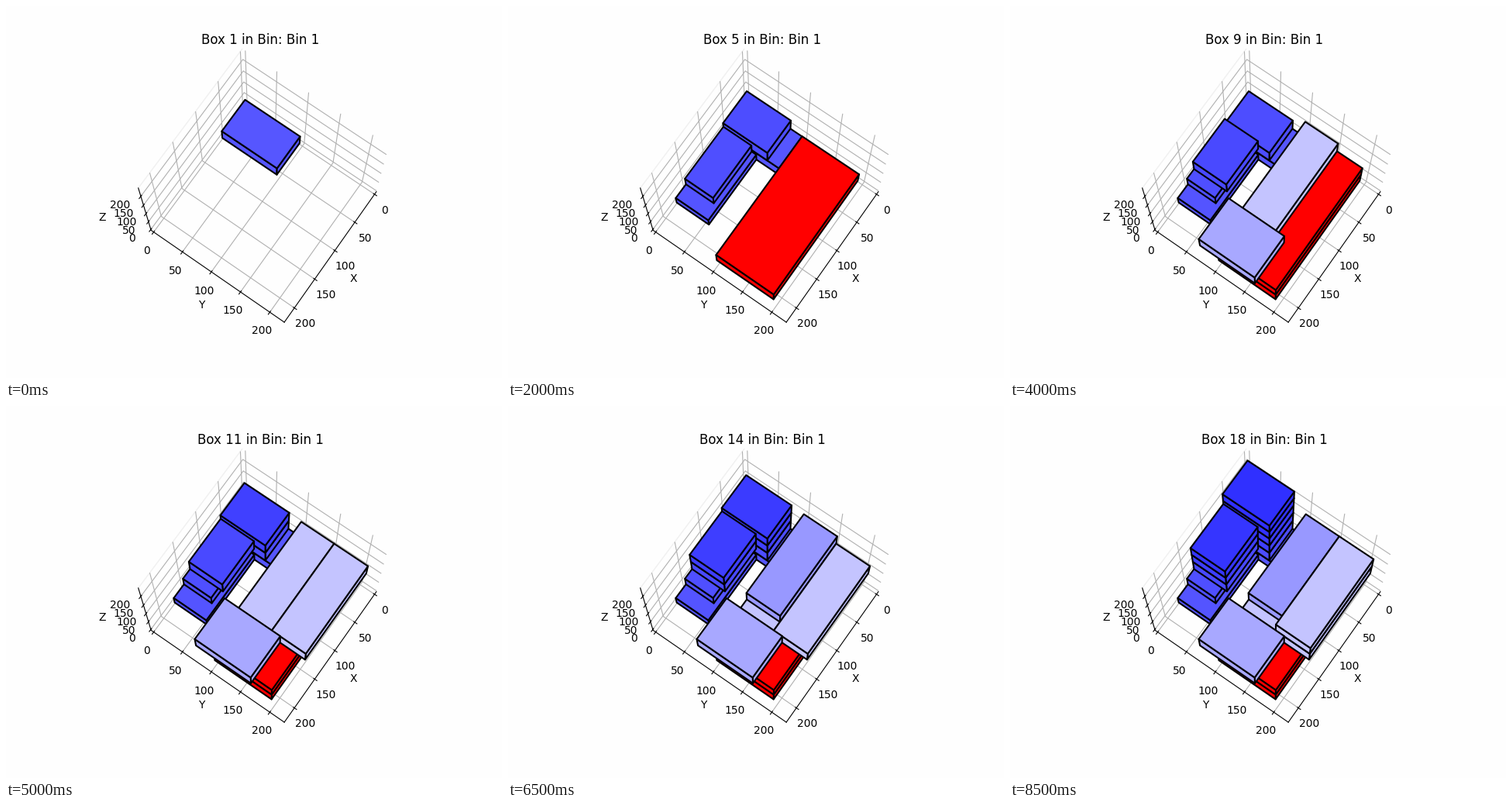
Write a matplotlib script that moves like this. It is 640x480 px and loops after 9000 ms.

```python
import matplotlib.pyplot as plt
from matplotlib.animation import FuncAnimation
from mpl_toolkits.mplot3d.art3d import Poly3DCollection

PAPER = "#fefefe"
RED, LILAC, PALE, VIOLET = "#ff0000", "#a8a8ff", "#c4c4ff", "#9898ff"
SIDE, HEIGHT = 220, 240
STEPS, STEP_MS = 18, 500
TAPER = 0.925  # each box in a stack is a little flatter than the one below


def blue(step):
    level = (88 - 2.2 * step) / 255
    return level, level, 1


def visible_faces(x0, x1, y0, y1, z0, z1):
    """The three faces that look towards the camera."""
    front = [(x1, y0, z0), (x1, y1, z0), (x1, y1, z1), (x1, y0, z1)]
    right = [(x0, y1, z0), (x1, y1, z0), (x1, y1, z1), (x0, y1, z1)]
    top = [(x0, y0, z1), (x1, y0, z1), (x1, y1, z1), (x0, y1, z1)]
    return [front, right, top]


def padded(size):
    return -size / 48, size * 49 / 48


fig = plt.figure(figsize=(6.4, 4.8), dpi=100, facecolor=PAPER)
ax = fig.add_subplot(projection="3d", computed_zorder=False, facecolor=PAPER)
ax.set_box_aspect((1, 1, 1))
ax.view_init(elev=75, azim=35)

for axis in (ax.xaxis, ax.yaxis, ax.zaxis):
    axis.set_pane_color(PAPER, 1)
    axis.set_ticks(range(0, 201, 50))
ax.yaxis.pane.set_edgecolor("#f0f0f0")

ax.set(xlabel="X", ylabel="Y", zlabel="Z")
ax.set_xlim(*padded(SIDE))
ax.set_ylim(*padded(SIDE))
ax.set_zlim(*padded(HEIGHT))
title = ax.set_title("")

boxes = {}


def stack(x, y, base, height, steps, color=None):
    """Pile one box per step on base and return the first box's top and the last."""
    tops = []
    for step in steps:
        top = base + height
        box = Poly3DCollection(
            visible_faces(*x, *y, base, top),
            facecolors=[color or blue(step)], edgecolors="black",
            linewidths=1.5, zorder=10 + len(boxes))
        ax.add_collection3d(box)
        boxes[step] = box
        tops.append(top)
        base, height = top, height * TAPER
    return tops[0], tops[-1]


# Stacks are added from back to front.
BACK, LEFT, MID, RIGHT = (0, 57), (0, 56), (95, 149.5), (149.5, 205)
LONG = (0, 148.5)

_, top = stack(BACK, (0, 95), 0, 36, [1])
stack(BACK, (0, 75), top, 41.5, [5, 11, 13, 17, 18])

_, top = stack((57, 173.5), LEFT, 0, 27, [2])
_, top = stack((57, 149), (0, 48), top, 32, [4])
stack((57, 132), LEFT, top, 40, [7, 12, 16])

_, deck = stack((0, 209), (95, 192), 0, 37, [3, 6], RED)
_, top = stack(LONG, MID, deck, 40, [9], PALE)
stack((0, 134), MID, top, 40 * TAPER, [14], VIOLET)
stack(LONG, RIGHT, deck, 40, [10, 15], PALE)
stack((148.5, 217.5), (72, 163.5), deck, 41.5, [8], LILAC)


def update(frame):
    count = frame + 1
    for step, box in boxes.items():
        box.set_visible(step <= count)
    title.set_text(f"Box {count} in Bin: Bin 1")
    return [title, *boxes.values()]


anim = FuncAnimation(fig, update, frames=STEPS, interval=STEP_MS,
                     init_func=lambda: update(0), repeat=True,
                     repeat_delay=0, blit=False)
plt.show()
```
